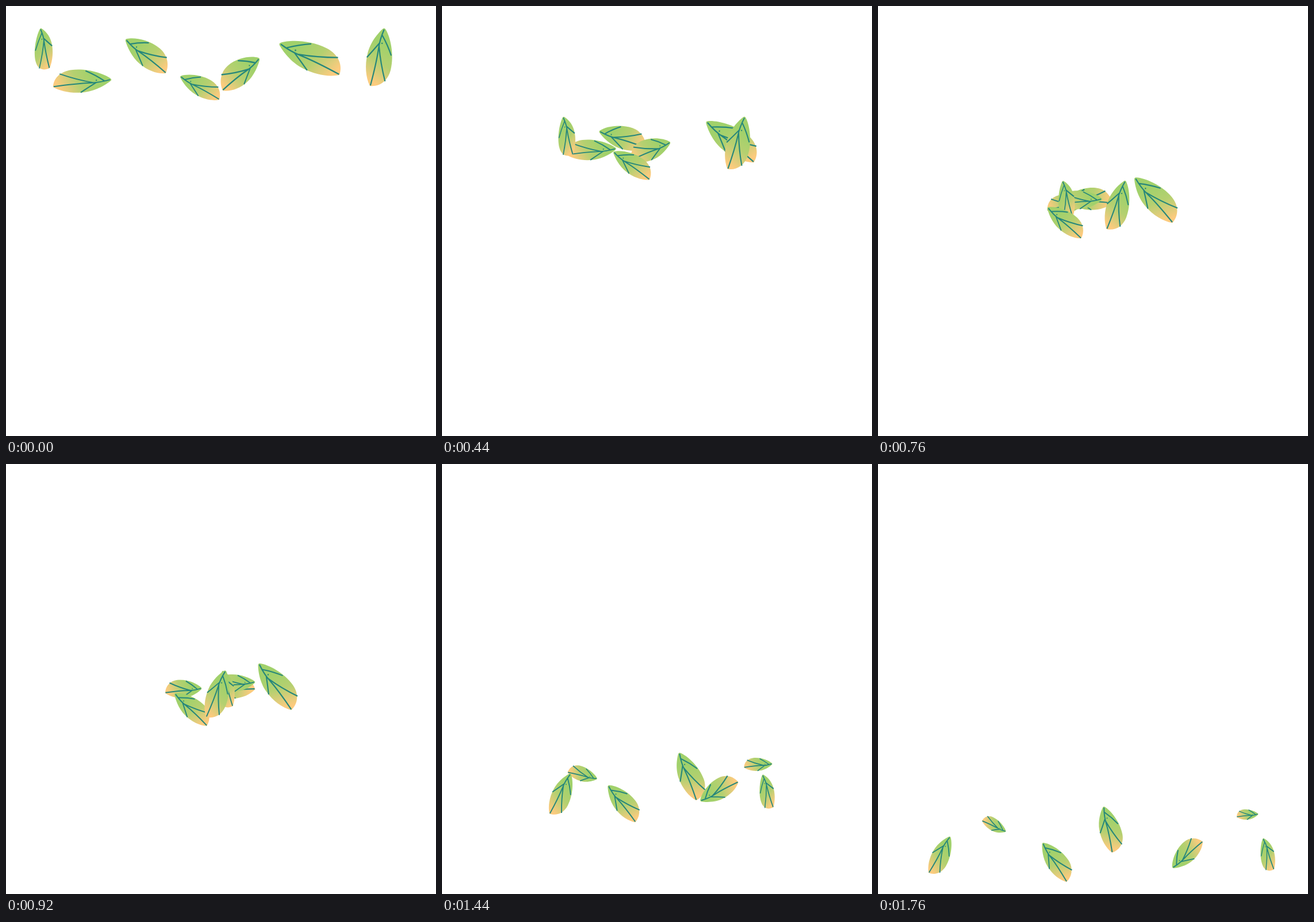
These frames come from a looping animation (748 by 748 pixels, 1.8 s). An HTML page with a canvas:

```html
<!DOCTYPE html>
<html>
<head>
<meta charset="utf-8">
<title>Falling leaves</title>
<style>
html, body { margin: 0; height: 100%; overflow: hidden; background: #fff; }
canvas { display: block; }
</style>
</head>
<body>
<canvas id="stage" width="748" height="748"></canvas>
<script>
const ctx = document.getElementById('stage').getContext('2d');
const LOOP = 1800, STEP = 40;

// Leaf space: stem at (0,0), far end at (1,0), full side towards +y.
const outline = new Path2D('M0 .022C.1 .125 .38 .266 .65 .266C.85 .266 .98 .15 1 0' +
  'C.88 -.1 .68 -.167 .47 -.167C.26 -.167 .08 -.075 0 -.022Q-.025 0 0 .022Z');
const veins = new Path2D('M.01 0Q.2 -.03 .35 -.012Q.6 .012 .99 .006M.11 -.008Q.25 .12 .41 .217' +
  'M.3 -.016Q.59 .08 .86 .222M.25 -.018Q.4 -.09 .54 -.162');
const dot = new Path2D();
dot.arc(.246, .022, .012, 0, 7);

const fill = ctx.createLinearGradient(.3, .16, .98, -.08);
fill.addColorStop(0, '#a1d16b');
fill.addColorStop(.4, '#b5d070');
fill.addColorStop(.65, '#d9cd79');
fill.addColorStop(.88, '#fccb7e');

// from, to: stem x, y, far end x, y; bow: sideways drift at half time;
// width and skew: start and end; side: -1 is mirrored. Back to front.
const leaves = [
  { from: [477, 66, 580, 120], to: [393, 597, 407, 676], bow: [7, 11], width: [1, 1.1], skew: [0, 0], side: 1 },
  { from: [209, 59, 278, 117], to: [513, 702, 565, 657], bow: [-4, -4], width: [1.1, 1.15], skew: [-.18, -.1], side: 1 },
  { from: [440, 92, 377, 147], to: [222, 639, 181, 621], bow: [8, 8], width: [1.2, 1.15], skew: [-.25, .1], side: -1 },
  { from: [182, 128, 82, 141], to: [661, 609, 624, 614], bow: [0, 0], width: [.95, 1.15], skew: [0, 0], side: -1 },
  { from: [60, 40, 76, 108], to: [670, 652, 689, 705], bow: [-2, 1], width: [1.14, 1.1], skew: [.4, .35], side: -1 },
  { from: [304, 123, 371, 163], to: [287, 660, 328, 727], bow: [0, -3], width: [1.04, 1.08], skew: [-.1, -.1], side: 1 },
  { from: [658, 40, 633, 139], to: [125, 649, 88, 711], bow: [1, 2], width: [1.04, 1.04], skew: [0, 0], side: 1 }
];

const mix = (a, b, k) => a + (b - a) * k;
const pose = ([x, y, u, v]) => ({
  x: (x + u) / 2, y: (y + v) / 2,
  angle: Math.atan2(v - y, u - x), size: Math.hypot(u - x, v - y)
});

for (const leaf of leaves) {
  leaf.a = pose(leaf.from);
  leaf.b = pose(leaf.to);
  const turn = leaf.b.angle - leaf.a.angle;
  leaf.b.angle = leaf.a.angle + Math.atan2(Math.sin(turn), Math.cos(turn));
}

function drawLeaf({ a, b, bow, width, skew, side }, k) {
  const at = key => mix(a[key], b[key], k);
  const arc = 4 * k * (1 - k), size = at('size');
  const dx = size * Math.cos(at('angle')), dy = size * Math.sin(at('angle'));
  const w = side * mix(...width, k), s = mix(...skew, k);
  ctx.setTransform(dx, dy, w * dy + s * dx, -w * dx + s * dy,
    at('x') + arc * bow[0], at('y') + arc * bow[1]);
  ctx.translate(-.5, 0);
  ctx.fillStyle = fill;
  ctx.fill(outline);
  ctx.strokeStyle = ctx.fillStyle = '#26877b';
  ctx.lineWidth = .9 / size + .012;
  ctx.stroke(veins);
  ctx.fill(dot);
}

function frame() {
  const k = Math.floor(performance.now() % LOOP / STEP) * STEP / (LOOP - STEP);
  ctx.resetTransform();
  ctx.clearRect(0, 0, 748, 748);
  for (const leaf of leaves) drawLeaf(leaf, k);
  requestAnimationFrame(frame);
}
frame();
</script>
</body>
</html>
```
